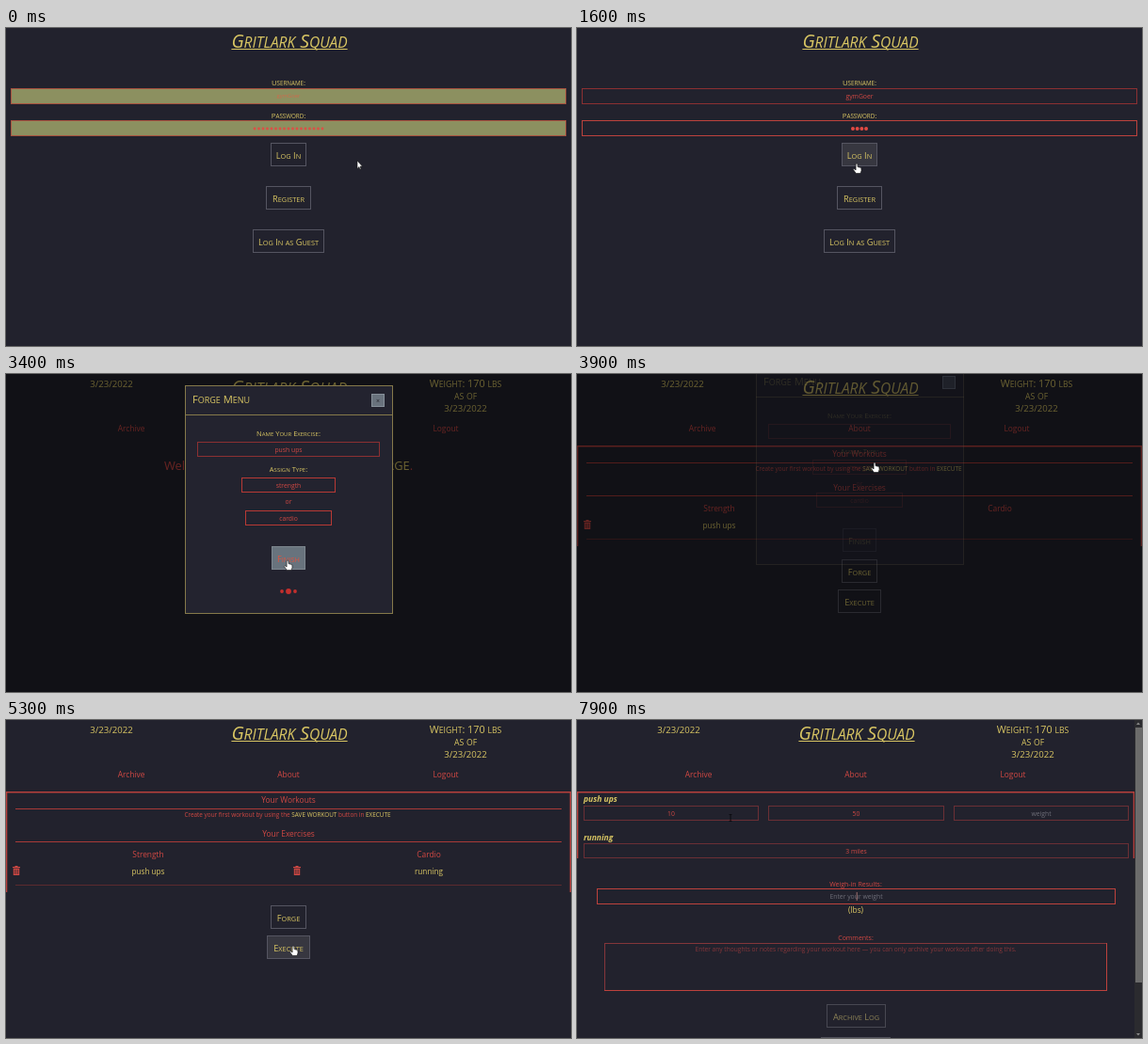
Recreate the animation shown at these times as an HTML page with a canvas. Size 600 by 338 pixels, loop 8 s.

```html
<!DOCTYPE html>
<html lang="en">
<head>
<meta charset="utf-8">
<title>Workout log</title>
<style>
html, body { margin: 0; width: 100%; height: 100%; overflow: hidden; background: #22222d; }
canvas { display: block; width: 600px; height: 338px; }
</style>
</head>
<body>
<canvas id="stage"></canvas>
<script>
const LOOP = 8000, STEP = 100, W = 600, H = 338;
const BG = '#22222d', YELLOW = '#d9c663', RED = '#d04843', GREY = '#6e6e78';
const EDGE = '#8c3032', DIM = '#6b2f35', FOCUS = '#bd423d';
const BODY = '"Open Sans", "Noto Sans", sans-serif', HEAD = BODY;
const BRAND = 'Gritlark Squad', USER = 'gymGoer', DATE = '3/23/2022';

const canvas = document.getElementById('stage');
const dpr = window.devicePixelRatio || 1;
canvas.width = W * dpr;
canvas.height = H * dpr;
const c = canvas.getContext('2d');
c.scale(dpr, dpr);

const clamp = v => Math.max(0, Math.min(1, v));
const ramp = (t, a, b) => clamp((t - a) / (b - a));
// Characters typed so far, evenly spaced between a and b.
const typed = (s, t, a, b) => s.slice(0, Math.round(s.length * ramp(t, a, b)));

function box(x0, y0, x1, y1, stroke, fill) {
  if (fill) { c.fillStyle = fill; c.fillRect(x0, y0, x1 - x0, y1 - y0); }
  if (stroke) {
    c.strokeStyle = stroke;
    c.lineWidth = 1;
    c.strokeRect(x0 + .5, y0 + .5, x1 - x0 - 1, y1 - y0 - 1);
  }
}

function line(x0, y, x1, color, h = 1) {
  c.fillStyle = color;
  c.fillRect(x0, y, x1 - x0, h);
}

function dot(x, y, r, color) {
  c.fillStyle = color;
  c.beginPath();
  c.arc(x, y, r, 0, Math.PI * 2);
  c.fill();
}

function text(s, x, y, size, color, align = 'center', style = '') {
  c.font = `${style} ${size}px ${BODY}`;
  c.textAlign = align;
  c.fillStyle = color;
  c.fillText(s, x, y);
  return c.measureText(s).width;
}

// Small capitals: lower-case runs become capitals at 80 %. Returns the span.
function caps(s, x, y, size, color, style = '') {
  const runs = s.match(/[a-z]+|[^a-z]+/g).map(r => {
    const font = `${style} ${/[a-z]/.test(r) ? size * .8 : size}px ${HEAD}`;
    c.font = font;
    return { s: r.toUpperCase(), font, w: c.measureText(r.toUpperCase()).width };
  });
  const total = runs.reduce((sum, r) => sum + r.w, 0);
  let left = x - total / 2;
  c.textAlign = 'left';
  c.fillStyle = color;
  for (const r of runs) {
    c.font = r.font;
    c.fillText(r.s, left, y);
    left += r.w;
  }
  return [x - total / 2, x + total / 2];
}

function button(label, x0, y0, x1, y1, fill, color = YELLOW, edge = '#555561') {
  box(x0, y0, x1, y1, edge, fill);
  caps(label, (x0 + x1) / 2, (y0 + y1) / 2 + 4, 9.2, color);
}

// Input with centred value, placeholder and caret.
function field(x0, y0, x1, y1, value, hint, focus, edge = EDGE) {
  const x = (x0 + x1) / 2, y = (y0 + y1) / 2 + 2.5;
  box(x0, y0, x1, y1, focus ? FOCUS : edge);
  let w = 0;
  if (value) w = text(value, x, y, 6.8, RED);
  else if (hint) text(hint, x, y, 6.8, GREY);
  if (focus) {
    c.fillStyle = '#cf8f8c';
    c.fillRect(x + w / 2 + .3, y - 7, .7, 9);
  }
}

function title(x) {
  const [a, b] = caps(BRAND, x, 21, 19.5, YELLOW, 'italic');
  line(a, 22, b, YELLOW);
}

function header(dx) {
  text(DATE, 112 + dx, 14, 9.6, YELLOW);
  title(301 + dx);
  caps('Weight: 170 lbs', 488 + dx, 14, 10.8, YELLOW);
  caps('as of', 488 + dx, 27, 10.8, YELLOW);
  text(DATE, 488 + dx, 39.5, 9.6, YELLOW);
  text('Archive', 133 + dx, 60.5, 8.4, RED);
  text('About', 300 + dx, 60.5, 8.4, RED);
  text('Logout', 467 + dx, 60.5, 8.4, RED);
}

function login(t) {
  const filled = t < 500;
  const user = typed(USER, t, 500, 1000), count = Math.round(4 * ramp(t, 1050, 1400));
  title(301);
  caps('Username:', 300, 61, 7.8, YELLOW);
  caps('Password:', 300, 95.5, 7.8, YELLOW);
  const olive = '#8c9060';
  if (filled) {
    box(5, 64, 595, 81, '#a8523f', olive);
    box(5, 98, 595, 115, '#a8523f', olive);
    text(USER, 300, 74, 5.8, '#cf6a4c');
    for (let i = 0; i < 17; i++) dot(264 + i * 4.5, 107, 1.4, '#dc5046');
  } else {
    const onPass = t >= 1050;
    field(5, 64, 595, 81, user, '', !onPass);
    box(5, 98, 595, 115, onPass ? FOCUS : EDGE);
    for (let i = 0; i < count; i++) dot(300 + (i - (count - 1) / 2) * 4.7, 107, 2, '#e04a43');
  }
  button('Log In', 281, 122, 319, 147, t >= 1550 ? '#373740' : null);
  button('Register', 276, 168, 324, 193);
  button('Log In as Guest', 262, 214, 338, 239);
}

// Coloured pieces laid out as one centred line.
function mixed(parts, x, y, size) {
  c.font = `${size}px ${BODY}`;
  let left = x - parts.reduce((sum, p) => sum + c.measureText(p[0]).width, 0) / 2;
  for (const [s, color] of parts) left += text(s, left, y, size, color, 'left');
}

function trash(x, y) {
  c.fillStyle = RED;
  c.fillRect(x - 4, y - 4, 8, 1.2);
  c.fillRect(x - 1.5, y - 5, 3, 1);
  c.fillRect(x - 3.2, y - 2.3, 6.4, 7.3);
  c.fillStyle = BG;
  for (const d of [-1.8, 0, 1.8]) c.fillRect(x + d - .3, y - 1.2, .6, 5);
}

function frameTop(right, bottom) {
  line(0, 76, right, '#b8403c', 1.5);
  c.fillRect(0, 76, 1.3, bottom - 76);
  c.fillRect(right - 1.3, 76, 1.3, bottom - 76);
}

function home(t) {
  header(0);
  if (t < 3700) {
    mixed([['Welcome! Create exercises using the ', RED], ['FORGE', YELLOW], ['.', RED]], 300, 101.5, 12.8);
    button('Forge', 281, 127, 319, 152, t >= 2500 ? '#373740' : null);
    return;
  }
  frameTop(600, 183);
  text('Your Workouts', 300, 88, 8.4, RED);
  line(10, 94, 590, '#a83a37');
  mixed([['Create your first workout by using the ', RED], ['SAVE WORKOUT', YELLOW],
    [' button in ', RED], ['EXECUTE', YELLOW]], 299, 103, 6.4);
  text('Your Exercises', 300, 123.5, 8.4, RED);
  line(10, 129, 590, '#a83a37');
  text('Strength', 151, 146, 8.4, RED);
  text('Cardio', 449, 146, 8.4, RED);
  trash(11, 160);
  text('push ups', 151, 164, 8.2, YELLOW);
  if (t >= 4800) {
    trash(309, 160);
    text('running', 449, 164, 8.2, YELLOW);
  }
  line(10, 175, 590, '#5c2a2e');
  button('Forge', 281, 197, 319, 222, t >= 4100 && t < 4300 ? '#373740' : null);
  button('Execute', 277, 229, 323, 254, t >= 5200 ? '#373740' : null);
}

function modal(t, p) {
  const second = t >= 4000, busy = t >= 3400 && t < 3700;
  const value = second ? typed('running', t, 4350, 4700) : t < 3700 ? typed('push ups', t, 2900, 3200) : '';
  const pressed = busy || t >= 4800;
  const kindSet = second ? t >= 4700 : t >= 3200 && t < 3700;
  const kindEdge = kindSet ? '#b83935' : EDGE;
  c.save();
  c.globalAlpha = p;
  c.translate(0, Math.round(-22 * (1 - p)));
  box(190, 12, 411, busy ? 255 : 222, '#85794a', '#23232f');
  line(190, 43, 411, '#85794a');
  caps('Forge Menu', 228.5, 30.5, 11.2, YELLOW);
  box(388, 21, 402, 35, '#87909a', '#69727d');
  text('×', 395, 30.5, 7, '#24242c');
  caps('Name Your Exercise:', 300, 66, 7.5, YELLOW);
  field(203, 72, 397, 88, value, '', !kindSet && p === 1);
  caps('Assign Type:', 300, 103.5, 7.5, YELLOW);
  box(250, 110, 350, 126, kindEdge);
  text('strength', 300, 120.5, 6.8, RED);
  text('or', 300, 138, 6.8, RED);
  box(254, 145, 346, 161, kindEdge);
  text('cardio', 300, 155.5, 6.8, RED);
  if (pressed) button('Finish', 282, 183, 318, 208, '#68737d', '#e0543f', '#7d868e');
  else button('Finish', 282, 183, 318, 208);
  if (busy) {
    for (let i = 0; i < 3; i++) {
      const r = i === Math.round((t - 3300) / 100) % 3 ? 2.9 : 1.9;
      dot(293 + i * 7, 231, r, '#c42f2d');
    }
  }
  c.restore();
}

function execute(t) {
  header(-4);
  frameTop(592, 147);
  const focus = t < 5800 ? -1 : t < 6100 ? 0 : t < 6600 ? 1 : t < 6800 ? 2 : t < 7600 ? 3 : 4;
  const reps = t < 6200 ? '' : t < 6400 ? '6' : typed('50', t, 6300, 6500);
  text('push ups', 7, 87, 8.5, YELLOW, 'left', 'italic bold');
  field(7, 91, 193, 107, typed('10', t, 5800, 6000), 'sets', focus === 0, DIM);
  field(203, 91, 390, 107, reps, 'reps', focus === 1, DIM);
  field(400, 91, 586, 107, '', 'weight', focus === 2, DIM);
  text('running', 7, 127.5, 8.5, YELLOW, 'left', 'italic bold');
  field(7, 131, 586, 147, typed('3 miles', t, 6850, 7500), 'length', focus === 3, DIM);
  text('Weigh-in Results:', 296, 176.5, 7, RED);
  field(21, 179, 572, 196, '', 'Enter your weight', focus === 4, DIM);
  text('(lbs)', 296, 205, 8.4, YELLOW);
  text('Comments:', 296, 234, 7, RED);
  // Inset border: the lower and right edges are lighter.
  box(29, 237, 563, 288, '#84363a');
  line(29, 287, 563, FOCUS);
  c.fillRect(562, 237, 1, 51);
  text('Enter any thoughts or notes regarding your workout here — you can only archive your workout after doing this.',
    296, 246, 6.6, '#85363a');
  button('Archive Log', 265, 302, 328, 327, null, '#8c8256', '#484852');
  line(259, 337, 333, '#50505a');

  box(592, 0, 600, 338, null, '#2b2b2f');
  box(593, 8, 600, 279, null, '#6b6b6b');
  c.fillStyle = '#8a8a8a';
  for (const [y, d] of [[4, -1], [334, 1]]) {
    c.beginPath();
    c.moveTo(594, y - d);
    c.lineTo(598, y - d);
    c.lineTo(596, y + d * 1.5);
    c.fill();
  }
}

// Filled outline from a tip point and offsets to it.
function pointerShape(x, y, points) {
  c.beginPath();
  for (const [dx, dy] of points) c.lineTo(x + dx, y + dy);
  c.closePath();
  c.fillStyle = '#fff';
  c.strokeStyle = '#111';
  c.lineWidth = .6;
  c.fill();
  c.stroke();
}

const arrow = (x, y) => pointerShape(x, y,
  [[0, 0], [0, 8.4], [1.9, 6.7], [3, 9.2], [4.1, 8.7], [3, 6.2], [5.4, 6]]);

const hand = (x, y) => pointerShape(x, y,
  [[-.9, .6], [0, 0], [.9, .6], [1, 3.6], [4.8, 4.6], [5, 7.6], [4, 10.5], [-.6, 10.5],
    [-3.6, 6.6], [-3, 5.6], [-.9, 7]]);

function beam(x, y) {
  c.fillStyle = '#08080c';
  c.fillRect(x - .4, y - 4, .9, 8);
  c.fillRect(x - 1.5, y - 4, 3, .7);
  c.fillRect(x - 1.5, y + 3.3, 3, .7);
}

// Pointer path: time, x, y, shape used from that time on.
const PATH = [
  [0, 373, 141, arrow], [100, 373, 141, arrow], [400, 330, 73, beam], [1400, 330, 73, arrow],
  [1550, 297, 144, hand], [2000, 297, 144, arrow], [2500, 300, 139, hand], [2900, 300, 139, arrow],
  [3200, 300, 117, hand], [3350, 299, 198, hand], [3700, 299, 198, hand], [3900, 316, 94, hand],
  [4100, 310, 208, hand], [4400, 310, 208, arrow], [4650, 312, 150, hand], [4800, 319, 197, hand],
  [5000, 319, 197, arrow], [5200, 305, 240, hand], [5400, 305, 240, arrow], [5700, 163, 104, beam],
  [8000, 163, 104, beam]
];

function pointer(t) {
  const i = PATH.findIndex(k => k[0] > t) - 1;
  const [t0, x0, y0, shape] = PATH[i], [t1, x1, y1] = PATH[i + 1];
  const k = ramp(t, t0, t1), e = k * k * (3 - 2 * k);
  shape(x0 + (x1 - x0) * e, y0 + (y1 - y0) * e);
}

function draw(t) {
  c.fillStyle = BG;
  c.fillRect(0, 0, W, H);
  if (t < 2000) login(t);
  else if (t < 5400) {
    home(t);
    const first = t < 4000;
    const p = first ? ramp(t, 2700, 2900) - ramp(t, 3730, 3930)
                    : ramp(t, 4200, 4400) - ramp(t, 4870, 5070);
    const shade = first ? ramp(t, 2700, 2900) - ramp(t, 3900, 4050)
                        : ramp(t, 4200, 4400) - ramp(t, 5000, 5150);
    c.fillStyle = `rgba(0,0,0,${.5 * shade})`;
    c.fillRect(0, 0, W, H);
    if (p > 0) modal(t, p);
  } else execute(t);
  pointer(t);
}

const start = performance.now();
function tick() {
  const t = (performance.now() - start) % LOOP;
  draw(Math.floor(t / STEP) * STEP);
  requestAnimationFrame(tick);
}
tick();
</script>
</body>
</html>
```
